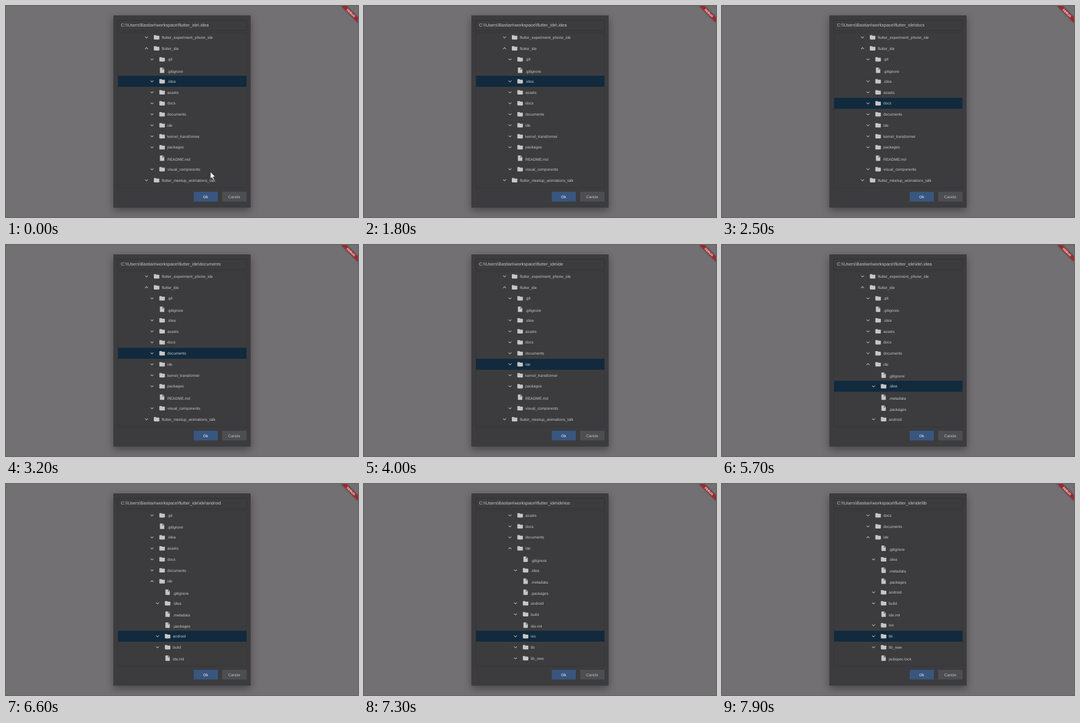
An HTML page for the animation above (8 s loop, 600x360 px).

```html
<!DOCTYPE html>
<html lang="en">
<head>
<meta charset="utf-8">
<title>Folder picker</title>
<style>
  html, body { margin: 0; width: 100%; height: 100%; overflow: hidden; background: #727072; }
  svg { display: block; width: 600px; height: 360px; }
  text {
    font-family: "Liberation Sans", Arial, sans-serif;
    font-size: 6.57px;
    fill: #c6c6c7;
    text-rendering: geometricPrecision;
    white-space: pre;
  }
  .dialog { fill: #3c3c3f; filter: drop-shadow(0 5px 7px rgba(0, 0, 0, .36)); }
  .frame { fill: none; stroke: #303033; stroke-width: .8; }
  .list { stroke: #353538; }
  .icon { fill: #c6c6c7; }
  .button { text-anchor: middle; }
  .banner { filter: drop-shadow(0 0 1.5px rgba(0, 0, 0, .5)); }
  #path { font-size: 7.5px; }
  #mark { fill: #122a3d; }
</style>
</head>
<body>
<svg viewBox="0 0 600 360">
  <defs>
    <clipPath id="view"><rect x="190" y="44.1" width="220" height="262.6"/></clipPath>
    <path id="folder" d="M10 4H4c-1.1 0-2 .9-2 2v12c0 1.1.9 2 2 2h16c1.1 0 2-.9 2-2V8c0-1.1-.9-2-2-2h-8l-2-2z"/>
    <path id="file" d="M6 2c-1.1 0-2 .9-2 2v16c0 1.1.9 2 2 2h12c1.1 0 2-.9 2-2V8l-6-6H6zm7 7V3.5L18.5 9H13z"/>
    <path id="down" d="M16.6 8.6 12 13.2 7.4 8.6 6 10l6 6 6-6z"/>
    <path id="up" d="M12 8l-6 6 1.4 1.4 4.6-4.6 4.6 4.6L18 14z"/>
  </defs>

  <rect width="600" height="360" fill="#727072"/>
  <rect class="dialog" x="183" y="16" width="234" height="328"/>
  <rect class="frame" x="190.5" y="24.5" width="219.5" height="17.5"/>
  <rect class="frame list" x="190.5" y="45.5" width="219.5" height="265" rx="1"/>
  <text id="path" x="196" y="35.3"></text>

  <g clip-path="url(#view)">
    <rect id="mark" x="191" width="219" height="18.75"/>
    <g id="rows"></g>
  </g>

  <rect x="320" y="317" width="41" height="16.5" fill="#385680"/>
  <text class="button" x="340.3" y="327.7" font-weight="bold">Ok</text>
  <rect x="368.5" y="317" width="41.5" height="16.5" fill="#4c4e51"/>
  <text class="button" x="389" y="327.7">Cancle</text>

  <g transform="translate(600 0) rotate(45)">
    <rect class="banner" x="-20" y="14" width="40" height="6" fill="#a0262e"/>
    <text class="button" y="18.8" font-weight="bold" style="font-size:5.1px;fill:#fff">DEBUG</text>
  </g>

  <path id="cursor" d="M0 0V12.2L2.8 9.6 4.7 14 6.7 13.1 4.8 8.8H8.6Z" fill="#fff" stroke="#222" stroke-width=".7"/>
</svg>
<script>
  const LOOP = 8000, ROW = 18.75, TOP = 53.5, LAST_SLOT = 11, IDE = 8;
  const ROOT = "C:\\\\Users\\Bastian\\workspace\\flutter_ide\\";
  const FILES = [".gitignore", "README.md", ".metadata", ".packages", "ide.iml", "pubspec.lock"];
  const $ = id => document.getElementById(id);

  const entries = (depth, names) => names.split(" ").map(name => ({ name, depth }));
  const head = [
    ...entries(0, "flutter_experiment_phone_ide flutter_ide"),
    ...entries(1, ".git .gitignore .idea assets docs documents ide")
  ];
  const tail = [
    ...entries(1, "kernel_transformer packages README.md visual_components"),
    ...entries(0, "flutter_meetup_animations_talk")
  ];
  const children = entries(2, ".gitignore .idea .metadata .packages android build ide.iml ios lib lib_new pubspec.lock");

  // Moment of each key press that moves the selection one row down
  const STEPS = [1900, 2500, 2900, 3600, 4600, 5500, 5900, 6200, 6500, 6800, 7000, 7300, 7600];
  const FIRST = 4, EXPAND = 4200;

  const icon = (id, x, y) =>
    `<use href="#${id}" class="icon" transform="translate(${x - 5.63} ${y - 5.63}) scale(.469)"/>`;

  function drawRow({ name, depth }, index, open) {
    const x = 239.5 + depth * 9.38, y = TOP + index * ROW;
    const isFile = FILES.includes(name);
    const expanded = name === "flutter_ide" || (open && index === IDE);
    const art = isFile
      ? icon("file", x + 17.2, y - .1)
      : icon(expanded ? "up" : "down", x, y) + icon("folder", x + 17.2, y);
    return `${art}<text x="${x + 26.1}" y="${y + (isFile ? 4.2 : 2.4)}">${name}</text>`;
  }

  let shown = "";
  function showList(selected, open) {
    const key = selected + "/" + open;
    if (key === shown) return;
    shown = key;
    const rows = open ? [...head, ...children, ...tail] : [...head, ...tail];
    const scroll = Math.max(0, selected - LAST_SLOT);
    const { name, depth } = rows[selected];
    $("rows").innerHTML = rows.map((row, i) => drawRow(row, i, open)).join("");
    $("rows").setAttribute("transform", `translate(0 ${-scroll * ROW})`);
    $("mark").setAttribute("y", TOP + (selected - scroll - .5) * ROW);
    $("path").textContent = ROOT + (depth === 2 ? "ide\\" : "") + name;
  }

  function showCursor(t) {
    const p = Math.min(1, Math.max(0, (t - 60) / 340));
    $("cursor").setAttribute("transform", `translate(${348.3 + 36 * p} ${282.8 + 80 * p * p})`);
    $("cursor").style.visibility = p < 1 ? "visible" : "hidden";
  }

  function render() {
    const t = performance.now() % LOOP;
    showList(FIRST + STEPS.filter(s => t >= s).length, t >= EXPAND);
    showCursor(t);
    requestAnimationFrame(render);
  }
  render();
</script>
</body>
</html>
```
